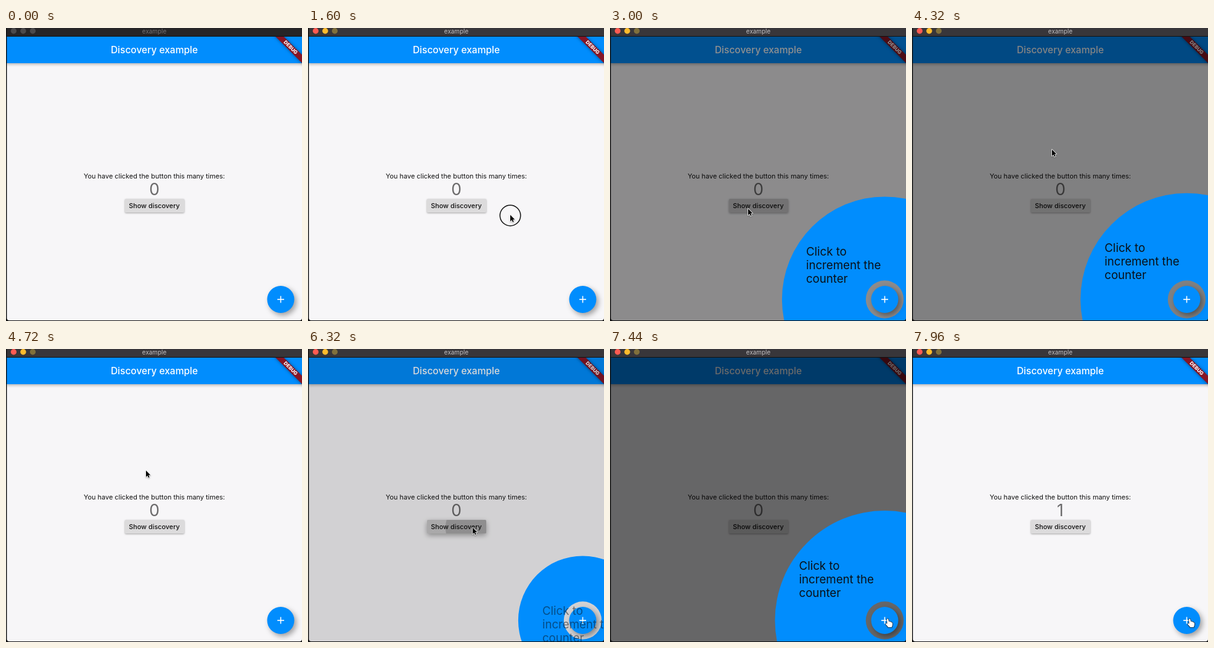
Animation of 480 by 475 pixels, one loop 8 s. Source, as an HTML page with a canvas:

```html
<!DOCTYPE html>
<html lang="en">
<head>
<meta charset="utf-8">
<title>Counter demo</title>
<style>
  html, body { margin: 0; height: 100%; overflow: hidden; background: #f7f6f8; }
  canvas { display: block; width: 480px; height: 475px; }
</style>
</head>
<body>
<canvas id="stage" width="480" height="475"></canvas>
<script>
const ctx = document.getElementById('stage').getContext('2d');
const W = 480, H = 475, LOOP = 8000;
const BLUE = '#018dfd';
const FAB = { x: 445.5, y: 440, r: 22 };
const BUTTON = { x: 193, y: 277, w: 96, h: 22 };
const WINDOW_FOCUS = 1500, COUNT_UP = 7520;

const CURSOR_PATH = [ // time, x, y
  [1000, 225, 487], [1450, 328, 303], [1750, 328, 303], [2350, 224, 293],
  [3400, 224, 293], [4000, 227, 197], [5200, 227, 197], [5900, 267, 289.5],
  [6700, 267, 289.5], [7250, 449, 438], [LOOP, 449, 438]
];
const BUTTON_PRESSES = [2550, 6115];
const CLICKS = [[1500, 1640], [2530, 2630], [4180, 4270], [6090, 6190], [7450, 7530]];
const OVERLAYS = [
  { open: 2630, close: 4260 },
  { open: 6195, close: 7460 }
];

const clamp = v => Math.max(0, Math.min(1, v));
const smooth = v => v * v * (3 - 2 * v);
const ramp = (t, start, length) => clamp((t - start) / length);

function rect(x, y, w, h, color) {
  ctx.fillStyle = color;
  ctx.fillRect(x, y, w, h);
}

function disc(x, y, r, color) {
  ctx.fillStyle = color;
  ctx.beginPath();
  ctx.arc(x, y, r, 0, Math.PI * 2);
  ctx.fill();
}

function text(str, x, y, size, color, weight = 400, align = 'center') {
  ctx.font = `${weight} ${size}px Inter, Roboto, sans-serif`;
  ctx.textAlign = align;
  ctx.fillStyle = color;
  ctx.fillText(str, x, y);
}

function withShadow(color, blur, dx, dy, draw) {
  ctx.save();
  ctx.shadowColor = color;
  ctx.shadowBlur = blur;
  ctx.shadowOffsetX = dx;
  ctx.shadowOffsetY = dy;
  draw();
  ctx.restore();
}

function cursorAt(t) {
  if (t < CURSOR_PATH[0][0]) return null;
  const i = CURSOR_PATH.findIndex(key => key[0] > t);
  const [t0, x0, y0] = CURSOR_PATH[i - 1], [t1, x1, y1] = CURSOR_PATH[i];
  const k = smooth((t - t0) / (t1 - t0));
  return { x: x0 + (x1 - x0) * k, y: y0 + (y1 - y0) * k };
}

function drawWindowFrame(active) {
  rect(0, 0, W, 13, active ? '#38363a' : '#262527');
  rect(0, 13, W, 1, '#111');
  const lights = active ? ['#fe5b52', '#fdbb2d', '#80703c'] : ['#4b4a4c', '#4b4a4c', '#4b4a4c'];
  lights.forEach((color, i) => disc(12.4 + i * 15.5, 4.8, 4.7, color));
  text('example', 240.5, 8.6, 9.9, active ? '#c4c2c5' : '#757376');

  ctx.fillStyle = '#111';
  ctx.beginPath();
  ctx.rect(0, 0, W, H);
  ctx.roundRect(1.4, -10, W - 1.4, H + 9, 4);
  ctx.fill('evenodd');
}

function drawButton(t, cursor) {
  const { x, y, w, h } = BUTTON;
  const press = BUTTON_PRESSES.find(p => t >= p && t < p + 500);
  const lift = press ? ramp(t, press, 120) * (1 - ramp(t, press + 220, 280)) : 0;
  const shape = () => {
    ctx.beginPath();
    ctx.roundRect(x, y, w, h, 1.6);
    ctx.fill();
  };
  ctx.fillStyle = '#dcdbdc';
  withShadow('rgba(0,0,0,.35)', 3 + lift * 5, 0, 1 + lift * 2, shape);

  if (cursor && cursor.x > x && cursor.x < x + w && cursor.y > y && cursor.y < y + h) {
    ctx.fillStyle = 'rgba(0,0,0,.04)';
    shape();
  }
  if (press) {
    ctx.save();
    ctx.fillStyle = `rgba(0,0,0,${0.05 * lift})`;
    shape();
    ctx.clip();
    disc(cursor.x, cursor.y, 6 + (t - press) * 0.185, `rgba(0,0,0,${0.16 * lift})`);
    ctx.restore();
  }
  text('Show discovery', 240.5, 292, 10.85, '#111', 500);
}

function drawPage(t, cursor) {
  rect(0, 13, W, H, '#f7f6f8');
  withShadow('rgba(0,0,0,.32)', 5, 0, 1.5, () => rect(0, 13, W, 44, BLUE));
  text('Discovery example', 240.5, 41, 15.52, '#fff', 500);
  text('You have clicked the button this many times:', 240.5, 244, 10.9, '#111');
  text(t < COUNT_UP ? '0' : '1', 240.5, 271, 26.5, '#6c6b6c');
  drawButton(t, cursor);
}

function drawDebugBanner() {
  ctx.save();
  ctx.beginPath();
  ctx.rect(0, 13, W, H);
  ctx.clip();
  ctx.translate(461.4, 31.6);
  ctx.rotate(Math.PI / 4);
  withShadow('rgba(0,0,0,.5)', 5, 0, 0, () => rect(-40, -4.7, 80, 9.4, '#861525'));
  text('DEBUG', 0, 2.4, 8, '#fff', 800);
  ctx.restore();
}

function drawFab() {
  withShadow('rgba(0,0,0,.36)', 8, 3.5, 4, () => disc(FAB.x, FAB.y, FAB.r, BLUE));
  rect(FAB.x - 5.5, FAB.y - 0.8, 11, 1.6, '#fff');
  rect(FAB.x - 0.8, FAB.y - 5.5, 1.6, 11, '#fff');
}

function overlayProgress(t) {
  const overlay = OVERLAYS.find(o => t >= o.open && t < o.close + 350);
  return overlay ? Math.min(ramp(t, overlay.open, 500), 1 - ramp(t, overlay.close, 350)) : 0;
}

function drawSpotlight(progress) {
  const radius = 56 + 122 * (1 - (1 - progress) ** 1.75);
  const visible = clamp(progress * 8);
  rect(0, 13, W, H, `rgba(0,0,0,${0.585 * progress})`);
  ctx.save();
  ctx.globalAlpha = visible;
  ctx.fillStyle = BLUE;
  ctx.beginPath();
  ctx.arc(FAB.x, FAB.y, radius, 0, Math.PI * 2);
  ctx.arc(FAB.x, FAB.y, 30.7, 0, Math.PI * 2);
  ctx.fill('evenodd');
  ctx.restore();
  return radius;
}

function drawHint(progress, radius) {
  const x = FAB.x - radius + 39, y = FAB.y - radius + 95.5;
  ['Click to', 'increment the', 'counter'].forEach((line, i) =>
    text(line, x, y + i * 22, 18.67, `rgba(10,16,24,${clamp(progress * 2)})`, 400, 'left'));
}

const ARROW = new Path2D('M0 0V10.4L2.4 8.2L4.1 11.8L5.7 11.1L4.1 7.5H7.4Z');
const HAND = new Path2D('M0 0C1-1.3 2.3-.6 2.5.8L3 4C4 3.2 5 3.6 5.3 4.4C6.2 4 7 4.4 7.2 5.2C8.2 5 9 5.6 9 6.6V9.5L7.8 13H2.3L-1.8 8.2C-2.2 7 -.8 6.3.5 7.4Z');

function drawCursor({ x, y }, t) {
  if (CLICKS.some(([down, up]) => t >= down && t < up)) {
    ctx.lineWidth = 1.5;
    ctx.strokeStyle = '#111';
    ctx.beginPath();
    ctx.arc(x, y + 1, 16.7, 0, Math.PI * 2);
    ctx.stroke();
  }
  const hand = Math.hypot(x - FAB.x, y - FAB.y) < FAB.r;
  const shape = hand ? HAND : ARROW;
  ctx.save();
  ctx.translate(x, y);
  ctx.lineJoin = 'round';
  ctx.lineWidth = hand ? 1.2 : 1.6;
  ctx.strokeStyle = hand ? '#111' : '#fff';
  ctx.fillStyle = hand ? '#fff' : '#000';
  withShadow('rgba(0,0,0,.3)', 2, 0, 1, () => ctx.stroke(shape));
  ctx.fill(shape);
  ctx.restore();
}

function render(now) {
  const t = now % LOOP;
  const cursor = cursorAt(t);
  const progress = overlayProgress(t);
  drawPage(t, cursor);
  drawDebugBanner();
  if (progress > 0) {
    const radius = drawSpotlight(progress);
    drawFab();
    drawHint(progress, radius);
  } else {
    drawFab();
  }
  drawWindowFrame(t >= WINDOW_FOCUS);
  if (cursor) drawCursor(cursor, t);
}

const start = performance.now();
function tick() {
  render(performance.now() - start);
  requestAnimationFrame(tick);
}
tick();
</script>
</body>
</html>
```
